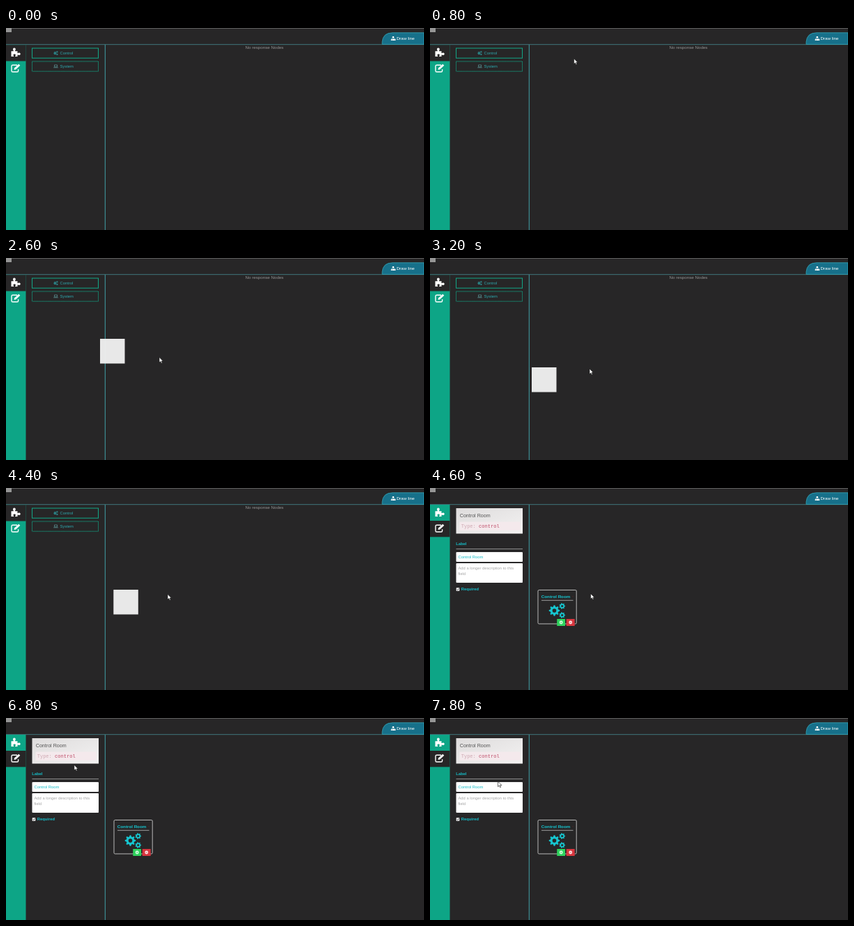
An HTML page for the animation above (8000 ms loop, 600x290 px).

```html
<!DOCTYPE html>
<html lang="en">
<head>
<meta charset="utf-8">
<title>Node editor</title>
<style>
  html, body { margin: 0; width: 100%; height: 100%; overflow: hidden; background: #272627; }
  svg { display: block; width: 100%; height: 100%; }
  text { font-family: "Liberation Sans", Arial, sans-serif; font-size: 5.8px; }
  .mono { font-family: "Liberation Mono", monospace; font-size: 7.05px; }
  .bold { font-weight: bold; }
</style>
</head>
<body>
<svg viewBox="0 0 600 290">
  <defs>
    <linearGradient id="card" x2="1" y2="1">
      <stop stop-color="#dedcdc"/><stop offset="1" stop-color="#f3f2f2"/>
    </linearGradient>
    <g id="puzzle" fill="#fff">
      <path d="M7.5 33.2h3.1c.6-.9-.6-1.4-.6-2.8a1.9 1.9 0 0 1 3.8 0c0 1.4-1.2 1.9-.6 2.8h3.3v2.9c.8.7 1.4-.5 2.5-.5a1.7 1.7 0 0 1 0 3.5c-1.1 0-1.7-1.2-2.5-.4V41h-3.1c-.8-.8.5-1.4.5-2.3 0-1.6-3.4-1.6-3.4 0 0 .9 1.2 1.6.4 2.3H7.5z"/>
    </g>
    <g id="edit" fill="none" stroke="#fff" stroke-width="1.4">
      <path d="M16 53.3H9.6Q8 53.3 8 55v6.4Q8 63 9.6 63H16q1.6 0 1.6-1.6V59.300"/>
      <path d="M11.500 59.900l.5-2.500 6.200-5.600 2.100 2-6.100 5.700z" fill="#fff" stroke="none"/>
    </g>
  </defs>

  <rect width="600" height="290" fill="#272627"/>
  <path d="M0 .4H600" stroke="#777" stroke-width=".8"/>
  <rect width="8" height="6" fill="#969696"/>
  <path d="M0 23.700H600" stroke="#437f85" stroke-width=".9"/>
  <path d="M540 23.500V20Q541 6.800 555 6.800H600V23.500z" fill="#17708a" stroke="#35a5b5" stroke-width=".8"/>
  <g fill="#fff">
    <path d="M554.600 12h2.400v2.100h-2.400zM552.700 16h2v2h-2zM555 16h2v2h-2zM557.200 16h2v2h-2z"/>
    <path d="M553.700 16v-1.100h4.500V16M555.900 14v2" fill="none" stroke="#fff" stroke-width=".5"/>
    <text x="560.500" y="17.300" style="font-size:6.25px">Draw line</text>
  </g>

  <rect y="24" width="28.500" height="266" fill="#0da586"/>
  <rect id="tab" width="28.500" height="23.300" fill="#272627"/>
  <use href="#puzzle"/><use href="#edit"/>

  <g id="before">
    <text x="343.500" y="30.400" fill="#949494" style="font-size:6.22px">No response Nodes</text>
    <g fill="none" stroke="#12a586" stroke-width="1">
      <rect x="37.500" y="29" width="95" height="14.200"/>
      <rect x="37.500" y="48" width="95" height="14.200" stroke-dasharray="1.2 .7"/>
    </g>
    <g fill="#2da9ae">
      <path class="gears" transform="translate(68.200 33) scale(.27)"/>
      <text x="77.500" y="38.200">Control</text>
      <text x="77.500" y="57.200">System</text>
    </g>
    <path d="M69.500 53h4v2.800h-4zM68.200 56.800h6.600" fill="none" stroke="#5f9b9d" stroke-width=".7"/>
  </g>

  <g id="after">
    <rect x="37.500" y="29" width="95.500" height="36.500" fill="url(#card)"/>
    <text x="42.800" y="41.600" fill="#555" style="font-size:7.1px">Control Room</text>
    <rect x="42.500" y="48.500" width="87" height="12.500" rx="1.500" fill="#f4e9ec"/>
    <text class="mono" x="44.700" y="57" fill="#cfa9b3" xml:space="preserve">Type: <tspan fill="#bd4a66">control</tspan></text>
    <g fill="#16bdc8">
      <text class="bold" x="37.300" y="82.300">Label</text>
      <text class="bold" x="44.800" y="147">Required</text>
    </g>
    <path d="M37.500 87.500H133" stroke="#aaa" stroke-width=".8"/>
    <g fill="#fff">
      <rect x="37.500" y="92" width="95.500" height="14" rx="1"/>
      <rect x="37.500" y="108" width="95.500" height="28" rx="1"/>
      <rect x="37.700" y="143.200" width="4.600" height="4.600" rx=".6"/>
    </g>
    <path d="M38.700 145.500l1.100 1.200 1.700-2.500" fill="none" stroke="#222" stroke-width=".8"/>
    <path d="M130.200 135.200l2-2M131.500 135.200l.7-.7" stroke="#888" stroke-width=".4"/>
    <text x="40.500" y="100.800" fill="#16bdc8">Control Room</text>
    <g fill="#a5a5a5">
      <text x="40.500" y="116.600">Add a longer description to this</text>
      <text x="40.500" y="124.500">field</text>
    </g>

    <rect x="155" y="146.500" width="55.200" height="48.500" rx="1.500" fill="#272627" stroke="#c9c9c9" stroke-width=".9"/>
    <text class="bold" x="159.800" y="157.700" fill="#16c5cf" style="font-size:6.23px">Control Room</text>
    <text x="204.300" y="157.500" fill="#7c2c31" style="font-size:4px">*</text>
    <path d="M160 161.300H205.500" stroke="#bbb" stroke-width=".8"/>
    <path class="gears" transform="translate(170.500 164.500)" fill="#16c5cf"/>
    <rect x="182.300" y="188" width="11.700" height="10" fill="#2fd35d"/>
    <rect x="195.700" y="188" width="12" height="10" fill="#d8363f"/>
    <circle cx="188.200" cy="193" r="2.400" fill="#e9fff0"/>
    <circle cx="201.700" cy="193" r="2.400" fill="#fff0f0"/>
    <path d="M187 193h2.400M188.200 191.800v2.400" stroke="#2fd35d" stroke-width=".7"/>
    <path d="M200.400 193h2.600" stroke="#d8363f" stroke-width=".8"/>
  </g>

  <path d="M142.300 24V290" stroke="#42a0a8" stroke-width="1"/>
  <rect id="ghost" width="35.500" height="35.500" fill="#efefef" opacity=".97"/>
  <path id="arrow" d="M0 0V7.600L1.800 6 3 8.700 4.300 8.100 3.100 5.500H5.400z" fill="#fff" stroke="#111" stroke-width=".6"/>
  <path id="hand" d="M-.6 .3Q0-.5.700.3V3L4 3.800Q4.800 4.200 4.500 5.200L4 7.400H-.3L-2.700 4.600Q-2.500 3.600-1.600 4L-.6 4.700z" fill="#fff" stroke="#111" stroke-width=".4"/>
</svg>
<script>
const LOOP = 8000, STEP = 200, DRAG = 2000, DROP = 4600;
const $ = id => document.getElementById(id);

// Keys are [time, x, y]
const cursorKeys = [
  [600, 250, 48], [1200, 120, 36], [1600, 117, 33.5], [2000, 122, 40],
  [2200, 142, 65], [2400, 176, 101], [2600, 220, 142.5], [2800, 225, 168],
  [3000, 227, 174], [3200, 229, 159], [3600, 231, 153], [4400, 232, 152.5],
  [5000, 228, 150], [5600, 102, 44], [5800, 98.5, 40], [6200, 98.5, 41],
  [7200, 97.5, 85], [7600, 97.5, 91]
];
const ghostKeys = [
  [2000, 38, 28], [2200, 43, 42], [2400, 62, 76], [2600, 135, 116],
  [2800, 140, 158], [3000, 143, 170], [3200, 146, 157], [3600, 151, 147],
  [4000, 154.3, 146]
];

function gear(cx, cy, r, teeth) {
  const points = [];
  for (let i = 0; i < teeth * 4; i++) {
    const a = (i - .5) / (teeth * 2) * Math.PI;
    const d = i % 4 < 2 ? r : r * .74;
    points.push(`${cx + d * Math.cos(a)} ${cy + d * Math.sin(a)}`);
  }
  const h = r * .36;
  return `M${points.join('L')}zM${cx - h} ${cy}a${h} ${h} 0 1 0 ${2 * h} 0a${h} ${h} 0 1 0 ${-2 * h} 0z`;
}

function at(keys, t) {
  if (t <= keys[0][0]) return keys[0].slice(1);
  const i = keys.findIndex(k => k[0] > t);
  if (i < 0) return keys[keys.length - 1].slice(1);
  const [t0, x0, y0] = keys[i - 1], [t1, x1, y1] = keys[i];
  const p = (t - t0) / (t1 - t0);
  return [x0 + (x1 - x0) * p, y0 + (y1 - y0) * p];
}

const show = (id, on) => $(id).setAttribute('visibility', on ? 'visible' : 'hidden');
const place = (id, [x, y]) => $(id).setAttribute('transform', `translate(${x} ${y})`);

function draw(time) {
  const t = Math.floor(time % LOOP / STEP) * STEP;
  const dropped = t >= DROP;
  const pointing = t >= 1200 && t < DRAG;
  show('before', !dropped);
  show('after', dropped);
  show('ghost', t >= DRAG && !dropped);
  show('hand', pointing);
  show('arrow', t >= 600 && !pointing);
  place('tab', [0, dropped ? 47 : 24.2]);
  place('ghost', at(ghostKeys, t));
  const pos = at(cursorKeys, t);
  place('arrow', pos);
  place('hand', pos);
}

const gears = gear(8, 11.5, 7.8, 8) + gear(19.2, 5, 4.4, 7) + gear(19.2, 18, 4.4, 7);
for (const el of document.querySelectorAll('.gears')) {
  el.setAttribute('d', gears);
  el.setAttribute('fill-rule', 'evenodd');
}

const start = performance.now();
function tick() {
  draw(performance.now() - start);
  requestAnimationFrame(tick);
}
tick();
</script>
</body>
</html>
```
